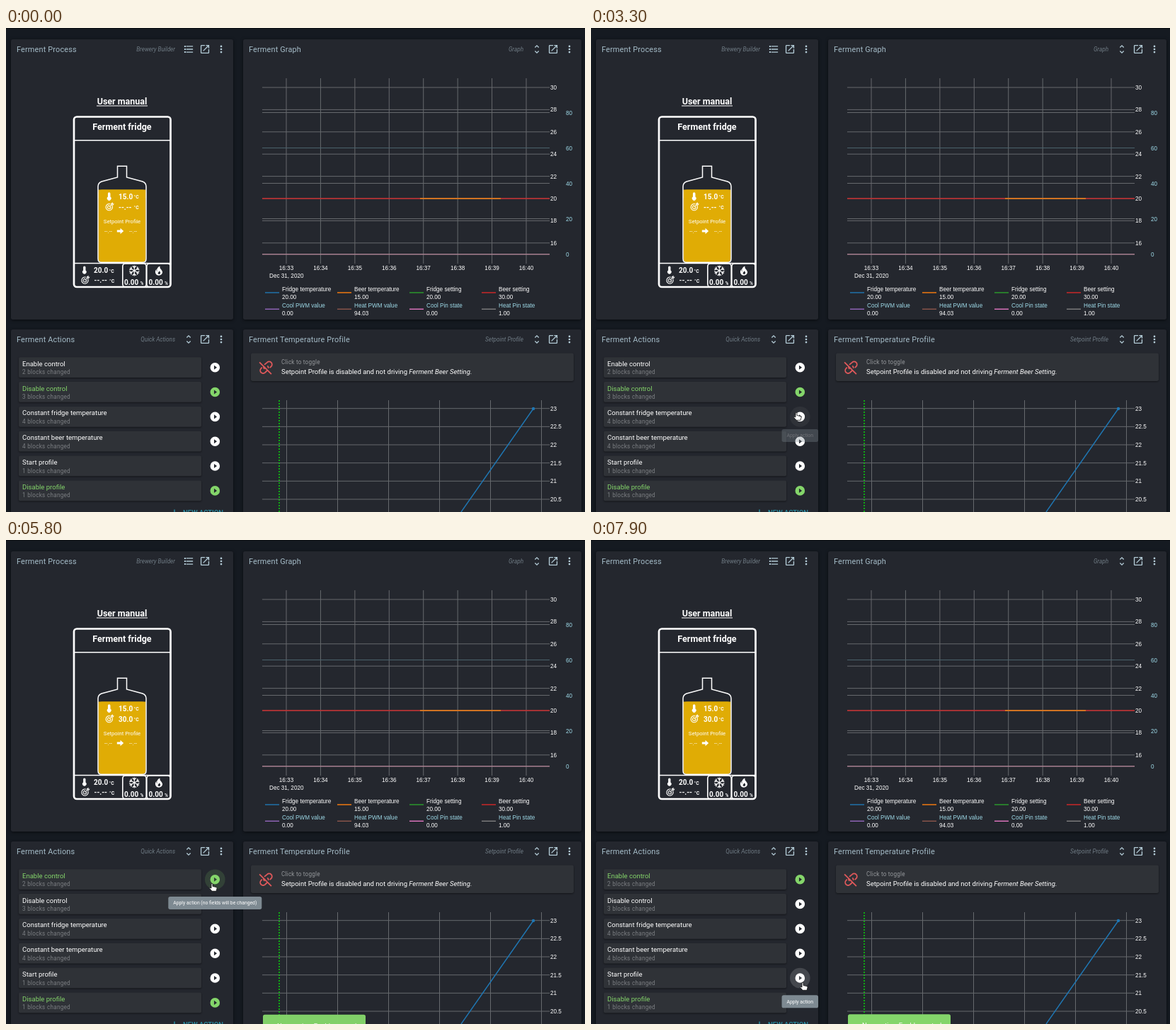
Animation, 818 px wide and 684 px high, one loop 8 s. Source, as an HTML page:

```html
<!DOCTYPE html>
<html lang="en">
<head>
<meta charset="utf-8">
<title>Ferment dashboard</title>
<style>
  html, body { margin: 0; width: 100%; height: 100%; overflow: hidden; background: #151a21; }
  svg { display: block; width: 818px; height: 684px; font-family: Roboto, sans-serif; }
  .plot { font-family: "Liberation Sans", Arial, sans-serif; }
  .panel { fill: #24272e; filter: drop-shadow(0 1px 2px #0009); }
  .card { fill: #2f3237; filter: drop-shadow(0 1px 1px #0007); }
  .line { fill: none; stroke: #fff; }
</style>
</head>
<body>
<svg id="stage" viewBox="0 0 818 684"></svg>
<script>
const WHITE = '#fff', GREEN = '#84d56a', TITLE = '#a5bcc8', PALE = '#9edae8', GRID = '#66696d';
const LOOP = 8000, STEP = 100, PITCH = 34.84, BTN_X = 295.3, BTN_Y = 479.7;
const ICON = {
  list: 'M7 5h14v2H7zM7 11h14v2H7zM7 17h14v2H7zM3 4.5h3v3H3zM3 10.5h3v3H3zM3 16.5h3v3H3z',
  open: 'M14 3v2h3.6L7.8 14.8l1.4 1.4L19 6.4V10h2V3zM19 19H5V5h7V3H5a2 2 0 0 0-2 2v14a2 2 0 0 0 2 2h14a2 2 0 0 0 2-2v-7h-2z',
  dots: 'M12 4a2 2 0 1 0 0 4a2 2 0 1 0 0-4M12 10a2 2 0 1 0 0 4a2 2 0 1 0 0-4M12 16a2 2 0 1 0 0 4a2 2 0 1 0 0-4',
  fold: 'M12 18.2L8.8 15l-1.4 1.4L12 21l4.6-4.6-1.4-1.4zM12 5.8L15.2 9l1.4-1.4L12 3 7.4 7.6 8.8 9z',
  thermo: 'M15 13V5a3 3 0 0 0-6 0v8a5 5 0 1 0 6 0z',
  arrow: 'M3 9h9V4l9 8-9 8v-5H3z',
  fire: 'M14 2.5C8 5 7.3 10 9 13.5c-1.5 0-2.2-3-1.5-5C5 10.500 4.500 13.500 5.200 16c1 3.300 4 5 6.800 5 4 0 7-3 7-6.500 0-5-6-6-5-12zM14.500 17.500c-1.500 1.700-4.500 1-4.500-1 0-2 2.500-2 2.500-4.500 1.500 1 3.500 3.500 2 5.500z',
  play: 'M10 16.5v-9l6 4.500zM12 2a10 10 0 1 0 0 20a10 10 0 1 0 0-20'
};
const ACTIONS = [['Enable control', 2], ['Disable control', 3], ['Constant fridge temperature', 4],
  ['Constant beer temperature', 4], ['Start profile', 1], ['Disable profile', 1]];

const text = (x, mid, s, size, fill = WHITE, more = '') =>
  `<text x="${x}" y="${mid + size * .355}" font-size="${size}" fill="${fill}" ${more}>${s}</text>`;
const plotText = (x, mid, s, fill) => text(x, mid, s, 8.17, fill, 'class="plot"');
const line = (x1, y1, x2, y2, color = GRID, w = 1, more = '') =>
  `<path d="M${x1} ${y1}L${x2} ${y2}" fill="none" stroke="${color}" stroke-width="${w}" ${more}/>`;
const rect = (x, y, w, h, r, more) => `<rect x="${x}" y="${y}" width="${w}" height="${h}" rx="${r}" ${more}/>`;
const icon = (cx, cy, k, d, fill = WHITE, more = '') =>
  `<path transform="translate(${cx - 12 * k} ${cy - 12 * k}) scale(${k})" d="${d}" fill="${fill}" fill-rule="evenodd" ${more}/>`;
const range = (n, f) => Array.from({ length: n }, (_, i) => f(i)).join('');
const btnY = i => BTN_Y + i * PITCH;

function panel(x, y, w, h, title, kind, first) {
  const r = x + w, mid = y + 14;
  return rect(x, y, w, h, 2.7, 'class="panel"')
    + text(x + 8, mid, title, 10.9, TITLE, 'letter-spacing=".16"')
    + text(r - 82, mid, kind, 8.17, '#6f7b84', 'text-anchor="end" font-style="italic"')
    + [first, 'open', 'dots'].map((n, i) => icon(r - 63 + i * 23, mid, .68, ICON[n], '#b3cbd6')).join('');
}

const goal = (cx, cy) => `<g transform="translate(${cx} ${cy}) scale(.5)" class="line" stroke-width="2.2">
  <path d="M8.500-4A9.300 9.300 0 1 1 3-9M4.300-1.500A4.600 4.600 0 1 1 1-4.500M0 0L7-7M6-10V-6H10L12-9H9V-12z"/></g>`;

const temp = (x, y, s, id = '') => text(x, y, s, 10, WHITE, `font-weight="700" ${id}`)
  + text(x + 21.5, y + .8, '°C', 6.8, WHITE, 'font-weight="700"');

function fridge() {
  const flake = range(6, i => `<path transform="rotate(${i * 60})" d="M0 0V-7.500M-2.500-6.700L0-4.400L2.500-6.700"/>`);
  const pct = x => text(x, 359.5, '0.00', 10, WHITE, 'font-weight="700"')
    + text(x + 22.5, 360.5, '%', 6.5, WHITE, 'font-weight="700"');
  return text(164, 104, 'User manual', 12.5, WHITE, 'font-weight="700" text-anchor="middle"')
    + line(128, 110, 200, 110, WHITE, 1.2)
    + rect(96, 125.5, 136.5, 240.5, 4, 'class="line" stroke-width="2.7"')
    + text(164, 139.300, 'Ferment fridge', 12.5, WHITE, 'font-weight="700" text-anchor="middle"')
    + line(96, 158.7, 232, 158.7, WHITE, 1.6)
    + rect(130.5, 228.500, 67, 102.500, 5, 'fill="#e0ac05"') + rect(130.500, 228.500, 67, 12, 0, 'fill="#e0ac05"')
    + '<path class="line" stroke-width="1.5" d="M157.500 211V195.300H170.500V211L193 217Q198 219 198 224V326Q198 331.300 193 331.300H135Q130 331.300 130 326V224Q130 219 135 217Z"/>'
    + line(96, 332.5, 232, 332.5, WHITE, 1.5)
    + rect(164.8, 333, 33.4, 33, 4, 'class="line" stroke-width="1.6"')
    + rect(198.8, 333, 33.4, 33, 4, 'class="line" stroke-width="1.6"')
    + icon(145.7, 238, .58, ICON.thermo) + temp(159, 238, '15.0')
    + goal(145.8, 253.2) + temp(159, 253, '--.--', 'id="beer"')
    + text(164, 273, 'Setpoint Profile', 7.7, WHITE, 'text-anchor="middle"')
    + text(144.5, 287, '--.--', 8, WHITE, 'text-anchor="middle"')
    + text(179.5, 287, '--.--', 8, WHITE, 'text-anchor="middle"')
    + icon(161.5, 287, .52, ICON.arrow)
    + icon(110.8, 342, .56, ICON.thermo) + temp(124, 342.3, '20.0')
    + goal(111.5, 356.7) + temp(124.5, 356.3, '--.--')
    + `<g class="line" stroke-width="1.200" transform="translate(181.300 343)">${flake}</g>`
    + icon(216, 343.3, .72, ICON.fire) + pct(167) + pct(201.5);
}

function graph() {
  const keys = [['Fridge temperature', '20.00', '#1f77b4'], ['Beer temperature', '15.00', '#ff7f0e'],
    ['Fridge setting', '20.00', '#2ca02c'], ['Beer setting', '30.00', '#d62728'],
    ['Cool PWM value', '0.00', '#9467bd'], ['Heat PWM value', '94.03', '#8c564b'],
    ['Cool Pin state', '0.00', '#e377c2'], ['Heat Pin state', '1.00', '#7f7f7f']];
  return range(8, i => {
      const x = 396 + i * 48.43, y = 84 + i * 31.4;
      return line(x, 71, x, 333) + line(362, y, 768, y)
        + text(x, 338.7, '16:' + (33 + i), 8.17, WHITE, 'class="plot" text-anchor="middle"')
        + plotText(769, y, 30 - 2 * i);
    })
    + range(5, i => {
      const y = 119.5 + i * 50;
      return line(362, y, 768, y, i == 1 ? '#4a626c' : GRID) + plotText(791, y + .2, 80 - 20 * i, PALE);
    })
    + plotText(372, 350, 'Dec 31, 2020')
    + line(362, 241, 768, 241, '#c62b2d', 1.4) + line(585, 241, 699, 241, '#e0891c', 1.4)
    + line(362, 319.7, 768, 319.7, '#a8808f', 1.5)
    + keys.map(([name, value, color], i) => {
      const x = 366 + i % 4 * 102, low = i > 3, y = low ? 392.3 : 369;
      return line(x, y + 5, x + 20, y + 5, color, 1.4)
        + plotText(x + 24, y, name, low ? PALE : WHITE) + plotText(x + 24, y + 11, value);
    }).join('');
}

function profile() {
  return rect(346, 459.5, 456, 39.5, 2.7, 'class="card"')
    + `<path transform="translate(355.500 467.700)" fill="none" stroke="#e0595b" stroke-width="1.800"
        d="M9.500 8.200L13.400 4.900a4 4 0 0 1 5.700 5.700L17.200 12.500M6.200 11.800L4.900 13.400a4 4 0 0 0 5.700 5.700L13.400 16.300M13.800 9.700a4 4 0 0 1 1.400 3.400M8.400 11a4 4 0 0 0 1.500 3.200M2.600 4.600L19.400 21.400"/>`
    + text(389, 472.3, 'Click to toggle', 8.17, '#94979b', 'letter-spacing=".2"')
    + text(389, 486, 'Setpoint Profile is disabled and not driving <tspan font-style="italic">Ferment Beer Setting.</tspan>', 9.54)
    + range(6, i => {
      const x = 396.5 + i * 72, y = 537.7 + i * 25.66;
      return line(x, 526, x, 684) + line(362, y, 768, y) + plotText(769, y, 23 - i / 2);
    })
    + line(386, 526, 386, 684, '#0be00b', 1.4, 'stroke-dasharray="2 2"')
    + line(643, 684, 745, 538, '#1f77b4', 1.4)
    + '<circle cx="745" cy="538" r="2.200" fill="#1f77b4"/>';
}

const actions = () => ACTIONS.map(([name, n], i) => {
    const y = btnY(i);
    return rect(18, y - 14.5, 258, 28.8, 2, 'class="card"')
      + text(23, y - 5.4, name, 9.54, WHITE, `id="name${i}"`)
      + text(23, y + 6.6, n + ' blocks changed', 8.17, '#7b7e82', 'letter-spacing=".27"')
      + `<circle id="halo${i}" cx="${BTN_X}" cy="${y}" r="14.300"/>`
      + icon(BTN_X, y, .68, ICON.play, WHITE, `id="btn${i}"`);
  }).join('')
  + line(238, 680.5, 238, 690, '#2a93a8', 1.4) + line(233.500, 685.2, 242.500, 685.2, '#2a93a8', 1.4)
  + text(250, 684.2, 'NEW ACTION', 9.54, '#2a93a8', 'font-weight="500"');

const tips = () => range(6, i => `<g id="tip${i}">${rect(0, btnY(i) + 24.3, 0, 18, 2.7, 'fill="#7e8a92"')}`
  + text(BTN_X, btnY(i) + 33.3, '', 6.8, WHITE, 'text-anchor="middle"') + '</g>');

const stage = document.getElementById('stage');
stage.innerHTML = rect(0, 0, 818, 1, 0, 'fill="#090c10"')
  + panel(7, 16, 314, 396, 'Ferment Process', 'Brewery Builder', 'list')
  + panel(335, 16, 478, 396, 'Ferment Graph', 'Graph', 'fold')
  + panel(7, 426, 314, 300, 'Ferment Actions', 'Quick Actions', 'fold')
  + panel(335, 426, 478, 300, 'Ferment Temperature Profile', 'Setpoint Profile', 'fold')
  + fridge() + graph() + actions() + profile()
  + `<g id="toast">${rect(363, 670.3, 145, 32, 2.7, `fill="${GREEN}"`)}${text(383, 686, 'Now active: Enable control', 9.54)}</g>`
  + tips()
  + `<g id="cursor" stroke-linejoin="round">
      <path id="point" d="M0 0V11.300L2.600 8.900L4.400 13L6.200 12.200L4.400 8.200H7.800Z" fill="#0c0c0c" stroke="#fff" stroke-width=".8"/>
      <path id="hand" d="M-1 1Q0-.6 1 1V4.500L6 5.600Q7.200 6 7 7.500L6 11.300H0L-3.500 7.200Q-3.300 5.700-1 7Z" fill="#fff" stroke="#111" stroke-width=".8"/>
    </g>`;

const el = {};
stage.querySelectorAll('[id]').forEach(n => el[n.id] = n);
const set = (id, attrs) => { for (const k in attrs) el[id].setAttribute(k, attrs[k]); };

// Cursor waypoints: time, x, y
const PATH = [[1400, 78, 1], [1600, 60, 70], [1900, 40, 215], [2200, 53, 319], [2800, 53, 319],
  [3100, 233, 455], [3200, 272, 506], [3300, 290, 543], [3400, 292, 548], [3500, 291, 489], [3700, 291, 485],
  [6200, 291, 485], [6500, 292, 515], [6800, 295, 618], [6900, 296, 641], [7000, 296, 645], [7100, 297, 647],
  [7200, 297, 634], [7300, 297, 627], [7500, 297, 622], [7800, 297, 622], [7900, 299, 625]];

function cursorAt(t) {
  if (t < PATH[0][0]) return null;
  const i = PATH.findIndex(p => p[0] > t);
  if (i < 0) return PATH[PATH.length - 1].slice(1);
  const [t0, x0, y0] = PATH[i - 1], [t1, x1, y1] = PATH[i], k = (t - t0) / (t1 - t0);
  return [x0 + (x1 - x0) * k, y0 + (y1 - y0) * k];
}

function hoverAt(t) {
  const p = cursorAt(t);
  return p ? ACTIONS.findIndex((_, i) => Math.hypot(p[0] - BTN_X, p[1] - btnY(i)) < 14.3) : -1;
}

function draw(now) {
  const t = Math.floor(now % LOOP / STEP) * STEP;
  const done = t >= 4900, busy = t >= 4700 && t < 5300;
  const hovers = [0, 1, 2].map(i => hoverAt(t - i * STEP));
  const p = cursorAt(t);

  el.beer.textContent = done ? '30.0' : '--.--';
  ACTIONS.forEach((_, i) => {
    const active = i == 5 || i == (done ? 0 : 1), color = active ? GREEN : WHITE;
    const shown = hovers.filter(h => h == i).length / 3;
    const w = active ? 132 : 51.5;
    set('name' + i, { fill: color });
    set('btn' + i, { fill: color, opacity: busy ? .6 : 1 });
    set('halo' + i, { fill: color, opacity: .15 * shown * (busy ? .6 : 1) });
    set('tip' + i, { opacity: shown, transform: `translate(0 ${-10 * (1 - shown)})` });
    const [box, label] = el['tip' + i].children;
    box.setAttribute('x', BTN_X - w / 2);
    box.setAttribute('width', w);
    label.textContent = active ? 'Apply action (no fields will be changed)' : 'Apply action';
  });

  const k = Math.min(1, Math.max(0, (t - 5300) / 700)), rest = (1 - k) ** 3;
  set('toast', { opacity: 1 - rest, transform: `translate(0 ${16 * rest})` });

  set('cursor', { visibility: p ? 'visible' : 'hidden', transform: p ? `translate(${p})` : '' });
  set('hand', { opacity: hovers[0] < 0 ? 0 : 1 });
  set('point', { opacity: hovers[0] < 0 ? 1 : 0 });
}

const start = performance.now();
function tick() {
  draw(performance.now() - start);
  requestAnimationFrame(tick);
}
tick();
</script>
</body>
</html>
```
